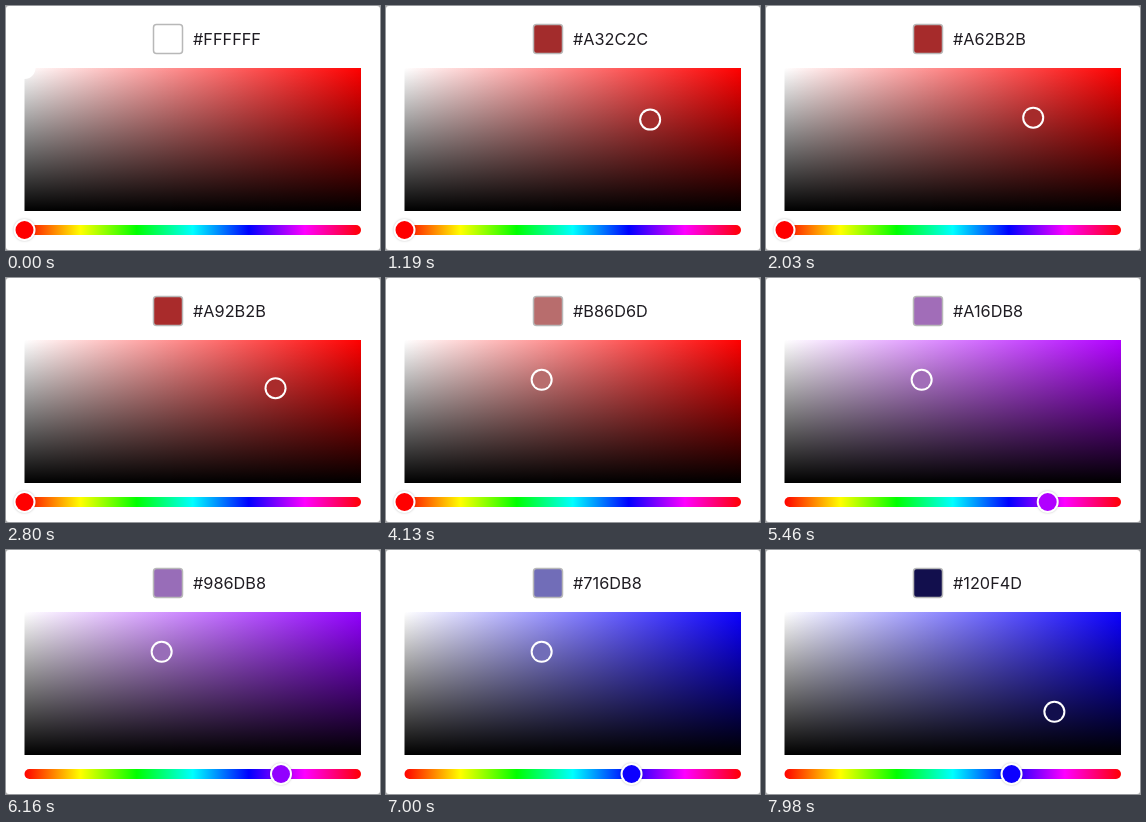
These frames come from a looping animation (374 by 244 pixels, 8000 ms). An HTML page with a canvas:

```html
<!DOCTYPE html>
<html lang="en">
<head>
<meta charset="utf-8">
<title>Colour picker</title>
<style>
  html, body { margin: 0; width: 100%; height: 100%; overflow: hidden; background: #fff; }
  canvas { display: block; width: 374px; height: 244px; }
</style>
</head>
<body>
<canvas id="stage"></canvas>
<script>
const W = 374, H = 244, LOOP = 8000, STEP = 70;
const area = { x: 18.5, y: 62, w: 336.5, h: 143 };
const bar = { y: 219, h: 10 };
const canvas = document.getElementById('stage');
const ctx = canvas.getContext('2d');
const ratio = window.devicePixelRatio || 1;
canvas.width = W * ratio;
canvas.height = H * ratio;
ctx.scale(ratio, ratio);

const linear = p => p;
const inOut = p => p * p * (3 - 2 * p);
const out = p => 1 - (1 - p) ** 3;

// Each key: time, saturation, value, easing into it
const cursorKeys = [
  [0, 0, 1, linear],
  [420, .014, .988, linear],
  [490, .014, .988, linear],
  [1190, .73, .639, inOut],
  [2730, .746, .663, inOut],
  [2800, .746, .663, linear],
  [3080, .42, .716, inOut],
  [3570, .4076, .7216, out],
  [7280, .4076, .7216, linear],
  [7980, .802, .302, inOut]
];

// Each key: time, hue, easing into it
const hueKeys = [
  [0, 0, linear],
  [4480, 0, linear],
  [4830, 95.2, linear],
  [5460, 281.6, linear],
  [6160, 274.4, inOut],
  [6580, 242.9, inOut]
];

function sample(keys, t) {
  const i = keys.findIndex(k => k[0] > t);
  if (i < 0) return keys[keys.length - 1].slice(1, -1);
  const a = keys[i - 1], b = keys[i];
  const p = b[b.length - 1]((t - a[0]) / (b[0] - a[0]));
  return a.slice(1, -1).map((v, n) => v + (b[n + 1] - v) * p);
}

function toHex(h, s, v) {
  const channel = n => {
    const k = (n + h / 60) % 6;
    const c = v - v * s * Math.max(0, Math.min(k, 4 - k, 1));
    return Math.round(c * 255).toString(16).padStart(2, '0');
  };
  return ('#' + channel(5) + channel(3) + channel(1)).toUpperCase();
}

function gradient(x0, y0, x1, y1, colors) {
  const g = ctx.createLinearGradient(x0, y0, x1, y1);
  colors.forEach((c, i) => g.addColorStop(i / (colors.length - 1), c));
  return g;
}

function roundBox(x, y, w, h, r) {
  ctx.beginPath();
  ctx.roundRect(x, y, w, h, r);
}

function disc(x, y, r, fill) {
  ctx.beginPath();
  ctx.arc(x, y, r, 0, Math.PI * 2);
  ctx.fillStyle = fill;
  ctx.fill();
}

const right = area.x + area.w, bottom = area.y + area.h;
const shade = gradient(0, area.y, 0, bottom, ['rgba(0,0,0,0)', '#000']);
const rainbow = gradient(area.x, 0, right, 0,
  ['#f00', '#ff0', '#0f0', '#0ff', '#00f', '#f0f', '#f00']);

function drawHeader(hex) {
  roundBox(147.5, 18.5, 29, 29, 3);
  ctx.fillStyle = hex;
  ctx.fill();
  ctx.strokeStyle = '#b8b8b8';
  ctx.lineWidth = 1.5;
  ctx.stroke();
  ctx.font = '16.3px Inter, Roboto, sans-serif';
  ctx.fillStyle = '#1f1c22';
  ctx.fillText(hex, 187, 39);
}

function drawArea(pure) {
  for (const fill of [gradient(area.x, 0, right, 0, ['#fff', pure]), shade]) {
    ctx.fillStyle = fill;
    ctx.fillRect(area.x, area.y, area.w, area.h);
  }
}

function drawCursor(s, v, hex) {
  const x = area.x + s * area.w, y = area.y + (1 - v) * area.h;
  disc(x, y, 11, '#fff');
  disc(x, y, 9, hex);
}

function drawBar(hue, pure) {
  roundBox(area.x, bar.y, area.w, bar.h, bar.h / 2);
  ctx.fillStyle = rainbow;
  ctx.fill();
  const x = area.x + hue / 360 * area.w, y = bar.y + bar.h / 2;
  ctx.save();
  ctx.shadowColor = 'rgba(0,0,0,.25)';
  ctx.shadowBlur = 2 * ratio;
  disc(x, y, 11, '#fff');
  ctx.restore();
  disc(x, y, 9, pure);
}

function draw(t) {
  const [s, v] = sample(cursorKeys, t);
  const [hue] = sample(hueKeys, t);
  const hex = toHex(hue, s, v), pure = toHex(hue, 1, 1);
  ctx.fillStyle = '#aaa';
  ctx.fillRect(0, 0, W, H);
  roundBox(0, 0, W, H, 3);
  ctx.fillStyle = '#fff';
  ctx.fill();
  drawHeader(hex);
  drawArea(pure);
  drawCursor(s, v, hex);
  drawBar(hue, pure);
}

const start = performance.now();
function tick() {
  const t = (performance.now() - start) % LOOP;
  draw(Math.floor(t / STEP) * STEP);
  requestAnimationFrame(tick);
}
tick();
</script>
</body>
</html>
```
